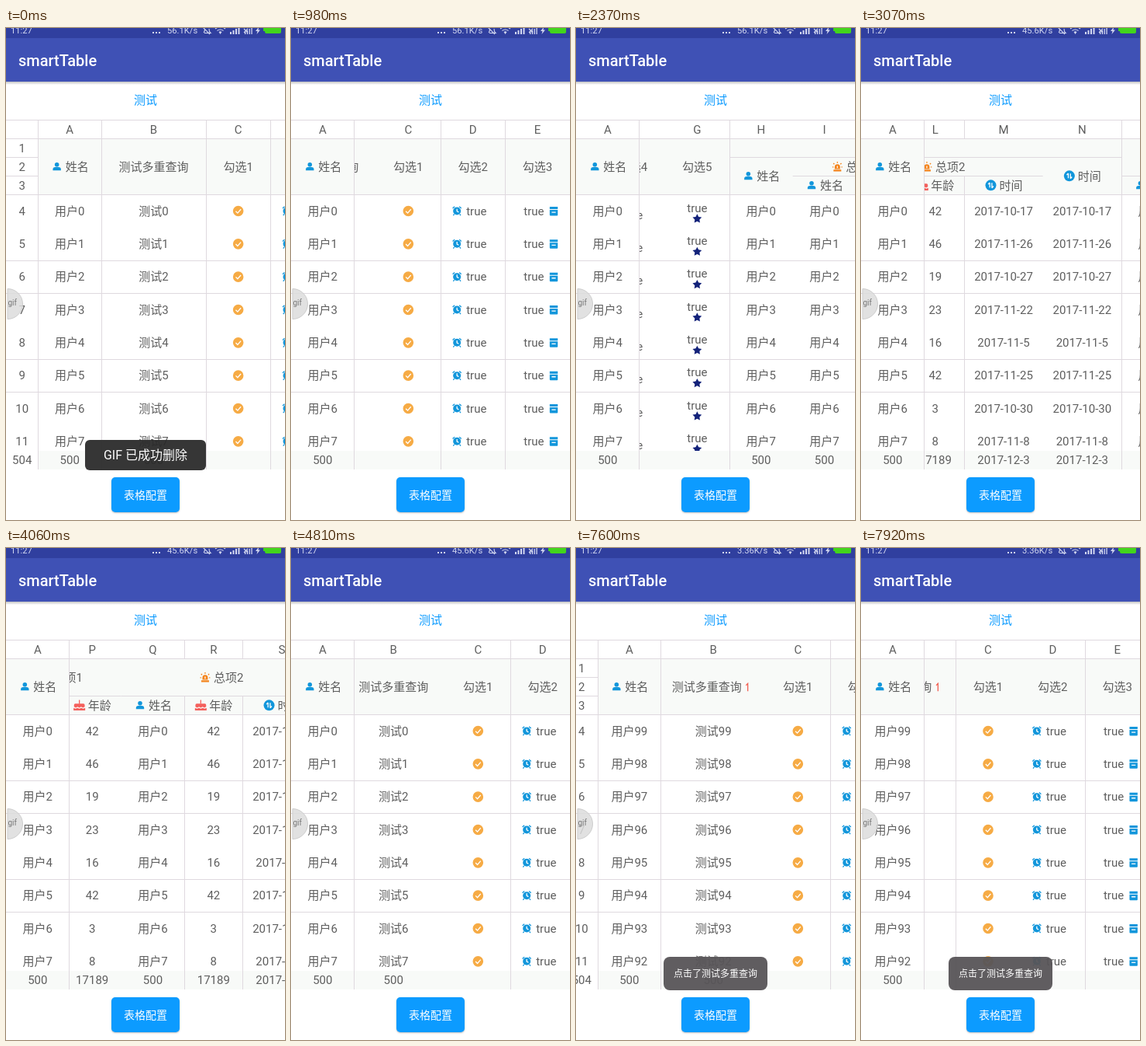
Animation of 360 by 633 pixels, one loop 8 s. Source, as an HTML page with a canvas:

```html
<!DOCTYPE html>
<html lang="zh">
<head>
<meta charset="utf-8">
<title>smartTable</title>
<style>
html, body { margin: 0; width: 100%; height: 100%; overflow: hidden; background: #fff; }
canvas { display: block; }
</style>
</head>
<body>
<canvas id="stage" width="360" height="633"></canvas>
<script>
const ctx = document.getElementById('stage').getContext('2d');
const LOOP = 8000;
const FONT = 'Roboto, "Noto Sans CJK SC", "Noto Sans CJK", sans-serif';
const BLUE = '#1296db', INK = '#5e5e5e', LINE = '#dfd9df', HEAD = '#f8faf8';

// Table geometry is in device pixels, three to one stage pixel.
const TOP = 357, HEAD_TOP = 427, LEVEL = 72, BODY = 643, ROW = 127, FOOT = 1632, END = 1704;
const INDEX_W = 124, NAME_W = 245;

const circle = r => `M${-r} 0a${r} ${r} 0 1 1 ${2 * r} 0a${r} ${r} 0 1 1 ${-2 * r} 0z`;
const star = 'M' + Array.from({ length: 10 }, (_, i) => {
  const r = i % 2 ? 3.2 : 6.2, a = i * Math.PI / 5;
  return (r * Math.sin(a)).toFixed(2) + ' ' + (-r * Math.cos(a)).toFixed(2);
}).join('L') + 'z';

// colour, filled path, stroked path, white stroked path
const icons = {
  person: [BLUE, 'M-2.8-2.6a2.8 2.8 0 1 1 5.6 0a2.8 2.8 0 1 1-5.6 0zM-5.2 5v-1.5q0-2.8 3-2.8h4.4q3 0 3 2.8v1.5z'],
  check: ['#f6ab45', circle(6.8), '', 'M-3.2 .2l2.4 2.4L3.4-2.2'],
  time: [BLUE, circle(7), '', 'M-1.4-3.4v6.4M-3.4-1.2l2-2.2M1.4 3.4v-6.4M3.4 1.2l-2 2.2'],
  alarm: [BLUE, circle(5), 'M-5.6-3.4l2.6-2.3M5.6-3.4l-2.6-2.3M-3.5 4l-1.3 1.7M3.5 4l1.3 1.7', 'M0-2.8v3l2.2 1.2'],
  calendar: [BLUE, 'M-5.2-5.5h10.4v3h-10.4zM-5.2-1.5h10.4v6.5q0 1-1 1h-8.4q-1 0-1-1z', '', 'M-2.6 1.6h5.2'],
  pencil: ['#d4237a', 'M-5.2 5.2l.6-4 5.2-5.2 3.4 3.4-5.2 5.2zM1.5-4.7l1.1-1.1q.8-.6 1.5 0l1.7 1.7q.6.8 0 1.5l-1.1 1.1z'],
  star: ['#13227a', star],
  siren: ['#f4841c', 'M-3.5 3.2v-2.7a3.5 3.5 0 0 1 7 0v2.7zM-5 4h10v2.2h-10z', 'M0-6.4v1.8M-5.2-4.4l1.3 1.3M5.2-4.4l-1.3 1.3M-6.4.5h1.3M6.4.5h-1.3', 'M0-.8v2.6'],
  cake: ['#f4605c', 'M-5.3-2h10.600q1.600 0 1.600 1.600v2.200l-2.300 1.400-2.300-1.400-2.300 1.400-2.300-1.400-2.300 1.400-2.300-1.400v-2.200q0-1.600 1.600-1.600zM-7.500 3.500l2.600 1 2.400-1 2.500 1 2.500-1 2.400 1 2.600-1v3.100h-15z', 'M0-6.800v5'],
  sort: ['#f26052', '', 'M-2.3-2.6l2.3-2.4v10']
};

const ages = [42, 46, 19, 23, 16, 42, 3, 8];
const dates = ['10-17', '11-26', '10-27', '11-22', '11-5', '11-25', '10-30', '11-8'];
const person = (i, sorted) => sorted ? 99 - i : i;

const centred = value => (x, y, i, sorted) => text(value(i, sorted), x, y);
const iconOnly = name => (x, y) => icon(name, x, y);
const flagged = (name, tx, ty, ix, iy) => (x, y) => {
  text('true', x + tx, y + ty);
  icon(name, x + ix, y + iy);
};

const kinds = {
  name: { w: NAME_W, title: '姓名', icon: 'person', foot: '500', cell: centred((i, s) => '用户' + person(i, s)) },
  query: { w: 405, title: '测试多重查询', foot: '500', cell: centred((i, s) => '测试' + person(i, s)) },
  age: { w: 225, title: '年龄', icon: 'cake', foot: '17189', cell: centred(i => ages[i]) },
  time: { w: 304, title: '时间', icon: 'time', foot: '2017-12-3', cell: centred(i => '2017-' + dates[i]) }
};
[
  iconOnly('check'),
  flagged('alarm', 4.6, 0, -20.5, 0),
  flagged('calendar', -4.6, 0, 21, 0),
  flagged('pencil', 0, 5, 0, -10.5),
  flagged('star', 0, -4, 0, 10)
].forEach((cell, i) => { kinds['flag' + (i + 1)] = { w: 250, title: '勾选' + (i + 1), cell }; });

// title, first column, last column, top level, levels tall
const groups = [
  ['总项', 7, 13, 0, 1], ['总项1', 8, 9, 1, 1], ['总项2', 10, 12, 1, 1],
  ['总项1', 14, 15, 0, 2], ['总项2', 16, 18, 0, 2]
];

let edge = INDEX_W;
const columns = ('name query flag1 flag2 flag3 flag4 flag5 name name age name age time time ' +
  'name age name age time time').split(' ').map((kind, i) => {
  const inside = groups.filter(g => i >= g[1] && i <= g[2]);
  const opened = inside.filter(g => g[1] === i);
  const level = Math.max(0, ...inside.map(g => g[3] + g[4]));
  const col = {
    ...kinds[kind], x: edge, letter: String.fromCharCode(65 + i), level,
    borderLevel: opened.length ? Math.min(...opened.map(g => g[3])) : level
  };
  edge += col.w;
  return col;
});
const levelY = n => HEAD_TOP + n * LEVEL;

// start, end, steps, first value, last value
const scrolls = [
  [0, 0, 1, 0, 0], [100, 680, 7, 40, 430], [980, 980, 1, 445, 445], [1150, 1520, 6, 510, 899],
  [1910, 2090, 3, 970, 1300], [2370, 2830, 6, 1430, 2690], [3070, 3780, 9, 2809, 4284],
  [3880, 3880, 1, 4285, 4285], [4060, 4330, 4, 3841, 2500], [4470, 4810, 5, 2000, 175],
  [6210, 6390, 3, 115, 0], [7600, 7920, 5, 40, 407]
];
const lifts = [[0, 0, 1, 0, 0], [1150, 1520, 6, 1, 5], [1910, 2090, 3, 3, 0]];
const toastRise = [[0, 0, 1, 28, 28], [6210, 6390, 3, 28, -6], [6500, 6590, 2, -2, 0]];

function stepped(track, t) {
  const [start, end, steps, a, b] = track.filter(s => t >= s[0]).pop();
  if (steps === 1) return b;
  const k = Math.min(steps - 1, Math.floor((t - start) / (end - start) * (steps - 1) + 1e-3));
  const p = k / (steps - 1);
  return Math.round(a + (b - a) * p * (1.5 - p / 2));
}

function text(value, x, y, size = 15, color = INK, align = 'center', weight = 400) {
  ctx.font = `${weight} ${size}px ${FONT}`;
  ctx.textAlign = align;
  ctx.fillStyle = color;
  ctx.fillText(value, x, Math.round(y + size * 0.355));
}

function icon(name, x, y) {
  const [color, fill, stroke, white] = icons[name];
  ctx.save();
  ctx.translate(x, y);
  ctx.fillStyle = ctx.strokeStyle = color;
  ctx.lineWidth = 1.3;
  if (fill) ctx.fill(new Path2D(fill));
  if (stroke) ctx.stroke(new Path2D(stroke));
  ctx.strokeStyle = '#fff';
  if (white) ctx.stroke(new Path2D(white));
  ctx.restore();
}

function rect(x, y, w, h, color) {
  ctx.fillStyle = color;
  ctx.fillRect(x, y, w, h);
}

function roundRect(x, y, w, h, r, color) {
  ctx.fillStyle = color;
  ctx.beginPath();
  ctx.roundRect(x, y, w, h, r);
  ctx.fill();
}

// Hairlines vanish on every third device pixel of the reduced screen.
const shown = v => ((v % 3) + 3) % 3 !== 2;
function vLine(x, y0, y1) {
  if (shown(x)) rect(Math.floor(x / 3), y0 / 3, 1, (y1 - y0) / 3, LINE);
}
function hLine(y, x0, x1) {
  if (shown(y)) rect(x0 / 3, Math.floor(y / 3), (x1 - x0) / 3, 1, LINE);
}

function clipped(x, y, w, h, draw) {
  ctx.save();
  ctx.beginPath();
  ctx.rect(x, y, w, h);
  ctx.clip();
  draw();
  ctx.restore();
}

function heading(title, iconName, x, y, sorted) {
  if (iconName) {
    text(title, x + 9.5, y);
    icon(iconName, x - 1.5 - ctx.measureText(title).width / 2, y);
  } else if (sorted && title === kinds.query.title) {
    text(title, x - 8.5, y);
    icon('sort', x + 44.5, y + 1);
  } else {
    text(title, x, y);
  }
}

function drawColumn(col, left, lift, sorted) {
  const x = (left + col.w / 2) / 3;
  if (x < -60 || x > 440) return;
  text(col.letter, x, ((TOP + HEAD_TOP) / 2 - lift) / 3);
  heading(col.title, col.icon, x, ((levelY(col.level) + BODY) / 2 - lift) / 3, sorted);
  clipped(left / 3, 119, col.w / 3, 425, () => {
    for (let i = 0; i < 8; i++) col.cell(x, (BODY + ROW * (i + 0.5) - lift) / 3, i, sorted);
  });
  if (col.foot) text(col.foot, x, 556);
}

function bands(x0, x1, lift) {
  rect(x0 / 3, 119, (x1 - x0) / 3, 449, '#fff');
  rect(x0 / 3, (HEAD_TOP - lift) / 3, (x1 - x0) / 3, (BODY - HEAD_TOP) / 3, HEAD);
  rect(x0 / 3, FOOT / 3, (x1 - x0) / 3, (END - FOOT) / 3, HEAD);
}

function rules(x0, x1, lift) {
  hLine(HEAD_TOP - lift, x0, x1);
  for (let y = BODY - lift; y < FOOT; y += ROW) hLine(y, x0, x1);
}

function drawIndex(scroll, lift) {
  const right = INDEX_W - scroll, x = (right - INDEX_W / 2) / 3;
  if (right <= 0) return;
  for (let i = 0; i < 3; i++) {
    text(i + 1, x, (levelY(i + 0.5) - lift) / 3);
    if (i) hLine(levelY(i) - lift, 0, right);
  }
  clipped(0, 119, right / 3, 425, () => {
    for (let i = 0; i < 8; i++) text(i + 4, x, (BODY + ROW * (i + 0.5) - lift) / 3);
  });
  text('504', x, 556);
  rules(0, right, lift);
}

function drawTable(t) {
  const scroll = stepped(scrolls, t), lift = stepped(lifts, t), sorted = t >= 5790;
  const nameLeft = Math.max(0, INDEX_W - scroll), nameRight = nameLeft + NAME_W;
  const pinned = nameLeft === 0;
  clipped(0, 119, 360, 449, () => {
    drawIndex(scroll, lift);
    clipped(nameRight / 3, 119, 360, 449, () => {
      bands(nameRight, 1080, lift);
      rules(nameRight, 1080, lift);
      for (const [title, first, last, level, tall] of groups) {
        const x0 = columns[first].x - scroll;
        const x1 = columns[last].x + columns[last].w - scroll;
        heading(title, 'siren', (x0 + x1) / 6, (levelY(level + tall / 2) - lift) / 3);
        hLine(levelY(level + tall) - lift, x0, x1);
      }
      for (const col of columns.slice(1)) {
        const left = col.x - scroll;
        drawColumn(col, left, lift, sorted);
        vLine(left, TOP, HEAD_TOP - lift);
        vLine(left, levelY(col.borderLevel) - lift, END);
      }
    });
    bands(nameLeft, nameRight, lift);
    rules(nameLeft, nameRight, lift);
    drawColumn(columns[0], nameLeft, lift, sorted);
    if (!pinned) vLine(nameLeft, TOP, END);
    rect(Math.floor((nameRight - pinned) / 3), 119, 1, 449, LINE);
  });
  rect(0, 118, 360, 1, LINE);
}

function drawStatus(t) {
  const pale = '#d3d8f0', green = '#42d51c';
  const speed = t < 2600 ? '56.1K/s' : t < 6810 ? '45.6K/s' : '3.36K/s';
  rect(0, 0, 360, 13, '#303f9f');
  text('11:27', 6, 3.2, 11.2, pale, 'left');
  for (let i = 0; i < 3; i++) rect(189 + i * 4, 5, 2, 2, pale);
  text(speed, 208, 3.2, 11.2, pale, 'left');
  ctx.strokeStyle = ctx.fillStyle = pale;
  ctx.lineWidth = 1.1;
  ctx.stroke(new Path2D('M255 6q1.5-1 1.5-5M262 1q0 4 2 5.5h-8M254-1l9 9M270 1q6.5-5 13 0M272.5 3.5q4-3 8 0'));
  ctx.fill(new Path2D('M274.5 5q2-1.5 4 0l-2 3zM326-1l-4 5h2.5l-1 4 4.5-5.5h-2.5z'));
  for (let i = 0; i < 4; i++) {
    rect(289 + i * 3.5, 5 - i * 2, 2, 3 + i * 2, pale);
    rect(308 + i * 2.8, 5 - i * 2, 1.3, 3 + i * 2, pale);
  }
  ctx.stroke(new Path2D('M307 1l5 5M312 1l-5 5'));
  roundRect(334, -4, 21, 11, 2, green);
  rect(332, 0, 2, 4, green);
}

function drawChrome(t) {
  rect(0, 13, 360, 56, '#3f51b5');
  drawStatus(t);
  text('smartTable', 16, 42, 20, '#fff', 'left', 500);
  const shade = ctx.createLinearGradient(0, 69, 0, 73);
  shade.addColorStop(0, 'rgba(0,0,0,.24)');
  shade.addColorStop(1, 'rgba(0,0,0,0)');
  rect(0, 69, 360, 4, shade);
  text('测试', 180, 93, 15, '#0c9bff');
}

function drawButton() {
  ctx.save();
  ctx.shadowColor = 'rgba(0,0,0,.25)';
  ctx.shadowBlur = 2;
  ctx.shadowOffsetY = 1;
  roundRect(136, 578, 88, 45, 5, '#0c9bff');
  ctx.restore();
  text('表格配置', 180, 601, 14, '#fff');
}

function drawBubble() {
  ctx.beginPath();
  ctx.arc(2, 355, 19.5, -Math.PI / 2, Math.PI / 2);
  ctx.closePath();
  ctx.fillStyle = 'rgba(220,220,220,.85)';
  ctx.fill();
  ctx.strokeStyle = '#cdcdcd';
  ctx.lineWidth = 1;
  ctx.stroke();
  text('gif', 2.5, 353.5, 10, '#777', 'left');
}

function drawToasts(t) {
  ctx.save();
  if (t < 600) {
    ctx.globalAlpha = Math.min(1, (600 - t) / 350);
    roundRect(102, 530, 156, 39, 6, 'rgba(42,42,42,.94)');
    text('GIF 已成功删除', 180, 549.5, 16, '#fff');
  } else if (t >= 6210) {
    const y = stepped(toastRise, t);
    ctx.globalAlpha = Math.min(1, 0.4 + (t - 6210) / 300);
    roundRect(113, 526 + y, 134, 43, 8, 'rgba(88,85,88,.95)');
    text('点击了测试多重查询', 180, 547.5 + y, 12, '#fff');
  }
  ctx.restore();
}

function frame(now) {
  const t = now % LOOP;
  rect(0, 0, 360, 633, '#fff');
  drawChrome(t);
  drawTable(t);
  drawBubble();
  drawButton();
  drawToasts(t);
  requestAnimationFrame(frame);
}
requestAnimationFrame(frame);
</script>
</body>
</html>
```
